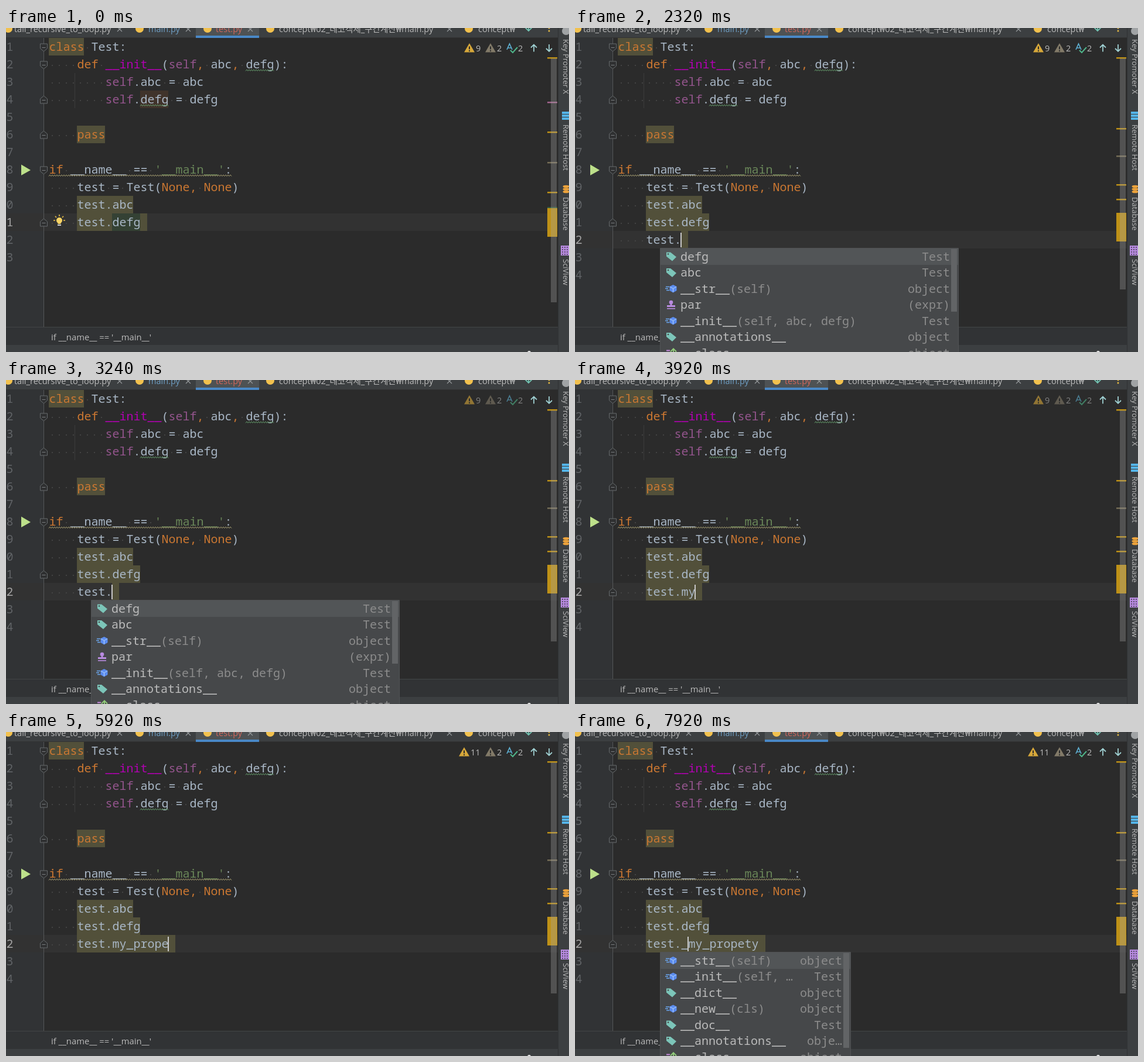
These frames come from a looping animation (961 px wide and 554 px high, 8000 ms). An HTML page:

```html
<!DOCTYPE html>
<html lang="en">
<head>
<meta charset="utf-8">
<title>Code completion in an editor</title>
<style>
html, body { margin: 0; width: 100%; height: 100%; overflow: hidden; background: #2b2b2b; }
svg { display: block; width: 961px; height: 554px; }
text { white-space: pre; }
.code { font: 20px "Noto Sans Mono", "DejaVu Sans Mono", monospace; }
.ui { font: 14.5px "Open Sans", "Noto Sans", "Noto Sans CJK KR", "Noto Sans CJK", sans-serif; }
</style>
</head>
<body>
<svg id="stage" viewBox="0 0 961 554"></svg>
<script>
const LOOP = 8000, LEFT = 73, CELL = 12, TOP = 17, ROW = 30;
const C = {
  fg: '#a9b7c6', key: '#cc7832', self: '#94558d', magic: '#b200b2', str: '#6a8759',
  warn: '#52503a', read: '#344134', write: '#40332b', yellow: '#be9117', panel: '#3c3f41', ui: '#bbbbbb'
};
const colX = c => LEFT + CELL * c;
const rowY = r => TOP + ROW * (r - 1);

const rect = (x, y, w, h, fill, extra = '') =>
  `<rect x="${x}" y="${y}" width="${w}" height="${h}" fill="${fill}" ${extra}/>`;
const path = (d, stroke, width = 1, fill = 'none') =>
  `<path d="${d}" stroke="${stroke}" stroke-width="${width}" fill="${fill}"/>`;
const fillPath = (d, fill) => `<path d="${d}" fill="${fill}"/>`;
const circle = (x, y, r, fill) => `<circle cx="${x}" cy="${y}" r="${r}" fill="${fill}"/>`;
const escape = s => s.replace(/&/g, '&amp;').replace(/</g, '&lt;');
const text = (x, y, s, fill, cls = 'ui', extra = '') =>
  `<text x="${x}" y="${y}" fill="${fill}" class="${cls}" ${extra}>${escape(s)}</text>`;
const cells = (row, from, to, fill) =>
  to > from ? rect(colX(from), rowY(row), CELL * (to - from), ROW, fill) : '';

function wave(row, from, to, color) {
  let d = `M${colX(from)} ${rowY(row) + 26.5}`;
  for (let x = colX(from); x < colX(to); x += 4) d += 'l2 -2.5l2 2.5';
  return path(d, color);
}

// A code line is a list of [string, color] runs.
function codeLine(row, runs) {
  let col = 0, out = '';
  for (const [s, color = C.fg] of runs) {
    if (s.trim()) out += text(colX(col) + .5, rowY(row) + 22, s, color, 'code');
    [...s].forEach((ch, i) => {
      if (ch === ' ') out += rect(colX(col + i) + 5, rowY(row) + 16, 2, 2, '#434343');
    });
    col += s.length;
  }
  return out;
}

const lines = {
  1: [['class', C.key], [' Test:']],
  2: [['    '], ['def ', C.key], ['__init__', C.magic], ['('], ['self', C.self], [',', C.key], [' abc'], [',', C.key], [' defg):']],
  3: [['        '], ['self', C.self], ['.abc = abc']],
  4: [['        '], ['self', C.self], ['.defg = defg']],
  6: [['    '], ['pass', C.key]],
  8: [['if', C.key], [' __name__ == '], ["'__main__'", C.str], [':']],
  9: [['    test = Test('], ['None', C.key], [',', C.key], [' '], ['None', C.key], [')']],
  10: [['    test.abc']],
  11: [['    test.defg']]
};

function fold(row, end) {
  const y = rowY(row) + 16, s = end ? -1 : 1;
  return path(`M58.5 ${y - 6 * s}h12v${8 * s}l-6 ${5 * s}l-6 ${-5 * s}z`, '#666a6c', 1, '#2f3031') +
    path(`M61.5 ${y + .5}h6`, '#7a7d7f');
}

function bulb(row) {
  const y = rowY(row) + 13;
  let rays = '';
  for (let i = 0; i < 5; i++) {
    const a = Math.PI * (1 + i / 4), dx = Math.cos(a), dy = Math.sin(a);
    rays += `M${91 + 7 * dx} ${y - 1 + 7 * dy}L${91 + 10 * dx} ${y - 1 + 10 * dy}`;
  }
  return path(rays, '#e8bd45', 1.6) + circle(91, y - 1, 5, '#f8d465') +
    rect(88.5, y + 2, 5, 3, '#f8d465') + rect(88, y + 6, 6, 2, '#d0d0d0');
}

function warning(x, color) {
  return fillPath(`M${x} 41.5L${x + 9} 26L${x + 18} 41.5z`, color) +
    rect(x + 8, 31.5, 2, 5, '#2b2b2b') + rect(x + 8, 38, 2, 2, '#2b2b2b');
}

function inspections(count, dim) {
  const x = count > 9 ? 773 : 782;
  const counters = warning(x, '#d6a73a') + text(x + 20, 40, String(count), C.ui) +
    warning(818, '#827a68') + text(838, 40, '2', C.ui) +
    path('M855 37l4.5 -10l4.5 10M857 34h5', '#5fb3d6', 1.6) +
    path('M861 38l4 4l8 -9', '#4fb58a', 2) + text(874, 40, '2', C.ui);
  return `<g opacity="${dim ? .6 : 1}">${counters}</g>` +
    path('M901 40.5v-12M896 33.5l5 -5l5 5M927 28v12M922 35l5 5l5 -5', '#9fd0d2', 1.8);
}

// Marks beside the scrollbar: [y, color] plus the tall block.
const stripes = {
  first: { thumb: 469, block: [308, 357], marks: [[51, C.yellow], [127, '#a1648c'], [178, C.yellow], [230, '#756d56'], [281, C.yellow], [307, '#32593d']] },
  plain: { thumb: 447, block: [316, 365], marks: [[51, C.yellow], [172, C.yellow], [219, '#756d56'], [268, C.yellow], [293, C.yellow]] },
  usage: { thumb: 447, block: [319, 365], marks: [[51, C.yellow], [172, C.yellow], [219, '#756d56'], [245, '#b9626a'], [268, '#28583a'], [293, '#28583a'], [317, '#28783a']] }
};
function errorStripe({ thumb, block, marks }) {
  return marks.map(([y, color]) => rect(924, y - 1, 17, 2.5, color)).join('') +
    rect(924, block[0], 17, block[1] - block[0], C.yellow) +
    rect(930, 52, 10, thumb - 52, '#a6a6a6', 'opacity=".32"');
}

const popupIcons = {
  field: y => fillPath(`M156 ${y - 7}h7l10 8l-7 7l-10 -8z`, '#7cc5b9') + circle(159, y - 4, 1.3, '#46484a'),
  method: y => path(`M155 ${y - 3}h6M154 ${y}h5M156 ${y + 3}h5`, '#6ba7ef', 1.5) +
    fillPath(`M167.5 ${y - 6.5}l6 3v7l-6 3.5l-6 -3.5v-7z`, '#5c8df0') + path(`M162 ${y - 3}l5.5 3l5.5 -3M167.5 ${y}v6`, '#b6d5fa'),
  template: y => circle(164, y - 4, 3.3, '#b98be0') + rect(162.5, y - 2, 3, 4, '#b98be0') +
    rect(157, y + 1, 14, 3, '#b98be0') + rect(157, y + 6, 14, 1.6, '#b98be0'),
  property: y => path(`M156 ${y - 4}h6M156 ${y}h6`, '#c98be0', 2) + path(`M168 ${y + 7}v-13M163 ${y - 2}l5 -5l5 5`, '#8fc978', 2)
};
const item = (icon, name, tail, type) => ({ icon, name, tail, type });
const members = [
  item('field', 'defg', '', 'Test'), item('field', 'abc', '', 'Test'),
  item('method', '__str__', '(self)', 'object'), item('template', 'par', '', '(expr)'),
  item('method', '__init__', '(self, abc, defg)', 'Test'),
  item('field', '__annotations__', '', 'object'), item('property', '__class__', '', 'object')
];
const popups = {
  early: { right: 655, bottom: 554, thumb: 485, items: members },
  full: { right: 672, bottom: 554, thumb: 485, items: members },
  short: { right: 672, bottom: 490, thumb: 0, items: [
    item('template', 'main', '', '(expr)'), item('field', '__module__', '', 'object'),
    item('method', '__format__', '(self, format_spec)', 'object'), item('field', '__memo__', '', 'object')
  ] },
  dunder: { right: 471, bottom: 554, thumb: 540, items: [
    item('method', '__str__', '(self)', 'object'), item('method', '__init__', '(self, …', 'Test'),
    item('field', '__dict__', '', 'object'), item('method', '__new__', '(cls)', 'object'),
    item('field', '__doc__', '', 'Test'), item('field', '__annotations__', '', 'obje…'),
    item('property', '__class__', '', 'object')
  ] }
};
function popup({ right, bottom, thumb, items }) {
  let out = rect(145, 377, right - 145, bottom - 377, '#46484a') + rect(146, 377, right - 147, 28, '#525557');
  items.forEach(({ icon, name, tail, type }, i) => {
    const y = 390.5 + 27.5 * i;
    out += popupIcons[icon](y) + text(180, y + 7, name, C.ui, 'code') +
      text(180 + CELL * name.length, y + 7, tail, '#8c8c8c', 'code') +
      text(right - 15, y + 7, type, '#8c8c8c', 'code', 'text-anchor="end"');
  });
  if (thumb) out += rect(right - 13, 378, 10, thumb - 378, '#626466');
  return out + path(`M145.5 ${bottom}V376.5H${right - .5}V${bottom}`, '#515355');
}

function tabs() {
  const names = [[14, 'tail_recursive_to_loop.py', C.ui], [243, 'main.py', '#6f9fc4'], [358, 'test.py', '#d3685d'],
    [466, 'concept₩02_데코객체_구간계산₩main.py', C.ui], [806, 'concept₩', C.ui]];
  return rect(0, 0, 961, 16, C.panel) + rect(0, 16, 943, 1, '#323232') +
    rect(324, 0, 108, 17, '#4e5254') + rect(324, 13, 108, 4, '#4a88c7') +
    names.map(([x, name, color]) => text(x, 7, name, color)).join('') +
    [4, 228, 344, 451, 790].map(x => circle(x, 1, 7, '#f2c14e')).join('') +
    [194, 311, 417, 757].map(x => path(`M${x - 4} -2l8 8m0 -8l-8 8`, '#969a9c', 1.2)).join('') +
    path('M892 -4v9M886 -1l6 6l6 -6', '#72c3b2', 1.8) + circle(927, 0, 1.5, '#e9bd45') + circle(927, 5, 1.5, '#e9bd45');
}

function sidebar() {
  const label = (y, s) => text(0, 0, s, C.ui, 'ui', `style="font-size:13px" transform="translate(951 ${y}) rotate(90)"`);
  let out = rect(942, 0, 1, 554, '#2f3133') + rect(943, 0, 18, 554, C.panel) +
    label(19, 'Key Promoter X') + label(165, 'Remote Host') + label(289, 'Database') + label(395, 'SciView') +
    circle(956, 5, 7, '#a0a3a5');
  for (let i = 0; i < 3; i++) {
    out += rect(949, 143 + 5 * i, 12, 4, '#55b5e8') +
      `<ellipse cx="956" cy="${271 + 4.5 * i}" rx="5.5" ry="2.3" fill="#eda33b"/>`;
  }
  out += rect(947, 372, 14, 17, '#b78be0');
  for (let i = 0; i < 16; i++) out += rect(949 + i % 4 * 4, 374 + (i >> 2) * 4, 2, 2, '#5b4a6b');
  return out;
}

function footer(crumb) {
  return rect(0, 511, 942, 31, '#313335') + rect(0, 511, 942, 1, '#434546') +
    (crumb ? text(77, 534, "if __name__ == '__main__'", C.ui, 'ui', 'style="font-size:14.8px"') : '') +
    rect(0, 542, 943, 12, C.panel) + circle(893, 555, 3, '#e8e8e8');
}

const type = (time, s, more) => [time, { text: s, caret: s.length, ...more }];
// "solid" is the highlighted span of the typed line; fresh letters stay bare until re-analysed.
const timeline = [
  [0, { row: 11, text: '', caret: null, solid: 0, bulb: 11, fold: 11, crumb: true, count: 9, dim: false, stripe: 'first', popup: '', usage: 'defg' }],
  [280, { caret: 9 }],
  [840, { caret: null }],
  type(1440, '', { row: 12, bulb: 0, stripe: 'plain', usage: '' }),
  type(1640, 't'),
  type(1720, 'te'),
  type(1760, 'tes', { crumb: false }),
  type(1840, 'test'),
  type(1920, 'test.'),
  [2120, { crumb: true }],
  [2280, { popup: 'early' }],
  type(2600, 'test', { popup: '', dim: true }),
  [2920, { usage: 'test', stripe: 'usage' }],
  type(3040, 'test.', { usage: '', stripe: 'plain' }),
  [3240, { popup: 'full' }],
  type(3400, 'test.m'),
  [3440, { popup: 'short' }],
  type(3600, 'test.my', { popup: '' }),
  [3920, { solid: 7, fold: 12 }],
  type(4240, 'test.my_'),
  [4320, { count: 11, dim: false, solid: 8 }],
  type(4600, 'test.my_p'),
  type(4720, 'test.my_pr'),
  type(4800, 'test.my_pro'),
  [5120, { solid: 11 }],
  type(5160, 'test.my_prop'),
  type(5320, 'test.my_prope'),
  type(5440, 'test.my_propet'),
  [5800, { solid: 14 }],
  type(5920, 'test.my_prope', { solid: 13 }),
  type(6080, 'test.my_propet'),
  type(6200, 'test.my_propety'),
  [6520, { solid: 15 }],
  [6880, { caret: 5 }],
  [7680, { bulb: 12 }],
  [7760, { text: 'test._my_propety', caret: 6, solid: 16, bulb: 0 }],
  [7880, { popup: 'dunder' }]
];

function highlights(s) {
  let out = cells(1, 0, 5, C.warn) + cells(6, 4, 8, C.warn) + cells(10, 4, 12, C.warn) + cells(11, 4, 13, C.warn);
  if (s.row === 11) out += cells(11, 13, 14, C.warn);
  else out += cells(12, 4, 4 + s.solid, C.warn) + cells(12, 4 + s.text.length, 5 + s.text.length, C.warn);
  if (s.usage === 'defg') out += cells(4, 13, 17, C.write) + cells(11, 9, 13, C.read);
  if (s.usage === 'test') out += cells(9, 4, 8, C.write) + [10, 11, 12].map(r => cells(r, 4, 8, C.read)).join('');
  return out;
}

function lineNumbers(s) {
  let out = '';
  for (let n = 1; n <= s.row + 2; n++)
    out += text(0.5, rowY(n) + 22, String(n % 10), n === s.row ? '#a4a3a3' : '#606366', 'code');
  return out;
}

function draw(s) {
  const caret = s.caret === null ? '' : rect(colX(4 + s.caret) - 1, rowY(s.row) + 3, 2, 25, '#c8c8c8');
  return rect(0, 0, 961, 554, '#2b2b2b') + rect(0, 0, 64, 511, '#313335') +
    rect(0, rowY(s.row), 942, ROW, '#323232') + rect(64, 17, 1, 494, '#555759') +
    rect(117, 77, 1, 60, '#3b3b3b') + highlights(s) + lineNumbers(s) +
    Object.entries(lines).map(([row, runs]) => codeLine(+row, runs)).join('') +
    (s.row === 12 ? codeLine(12, [['    ' + s.text]]) : '') +
    wave(2, 28, 32, '#659c6b') + wave(4, 13, 17, '#659c6b') + wave(8, 0, 26, '#a39b70') +
    [1, 2, 8].map(r => fold(r, false)).join('') + [4, 6, s.fold].map(r => fold(r, true)).join('') +
    fillPath('M26 233.5L42 243L26 252z', '#bde08a') + (s.bulb ? bulb(s.bulb) : '') + caret +
    inspections(s.count, s.dim) + errorStripe(stripes[s.stripe]) + footer(s.crumb) +
    tabs() + sidebar() + (s.popup ? popup(popups[s.popup]) : '');
}

const stage = document.getElementById('stage');
let shown = -1;
function render(time) {
  const step = timeline.filter(([at]) => at <= time).length;
  if (step === shown) return;
  shown = step;
  stage.innerHTML = draw(Object.assign({}, ...timeline.slice(0, step).map(([, change]) => change)));
}

let start = null;
function tick(now) {
  start ??= now;
  render((now - start) % LOOP);
  requestAnimationFrame(tick);
}
render(0);
requestAnimationFrame(tick);
</script>
</body>
</html>
```
